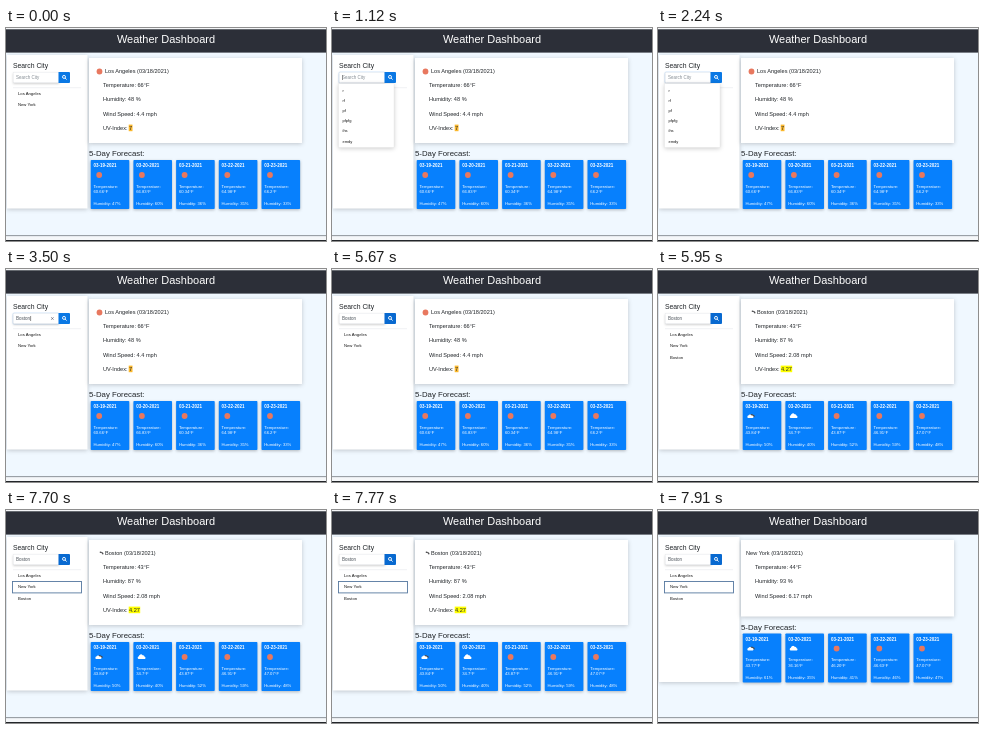
Write an HTML page that moves like this. It is 320 px wide and 213 px high and loops after 8 s.

```html
<!DOCTYPE html>
<html lang="en">
<head>
<meta charset="utf-8">
<title>Weather Dashboard</title>
<style>
html, body { margin: 0; width: 100%; height: 100%; overflow: hidden; background: #f0f8ff; }
svg { display: block; width: 100vw; height: 100vh; font-family: "Liberation Sans", Arial, sans-serif; fill: #212529; }
text { white-space: pre; }
.panel { fill: #fff; filter: drop-shadow(0 1.5px 2px #0003); }
.card { fill: #0780fd; filter: drop-shadow(0 1px 1.5px #0004); }
.field { fill: #fff; filter: drop-shadow(0 1px 1px #0003); }
.white { fill: #fff; }
.sun { fill: #e8785f; }
.anim { animation: 8s step-end infinite; }

.la { animation-name: la; }
.boston { animation-name: boston; }
.boston-uv { animation-name: bostonUv; }
.new-york { animation-name: newYork; }
.added { animation-name: added; }
.picked { animation-name: picked; }
.hint { animation-name: hint; }
.typed { animation-name: typed; }
.clear { animation-name: clear; }
.pressed { animation-name: pressed; }
.edge { animation-name: edge; }
.caret { animation-name: blink; }
.shrink { height: var(--h); animation-name: shrink; }
.lift { animation-name: lift; }
.ring { animation: ring 8s linear infinite; }
.menu { animation: menu 8s linear infinite; }

@keyframes la { 0% { opacity: 1 } 72.6%, 100% { opacity: 0 } }
@keyframes boston { 0% { opacity: 0 } 72.6% { opacity: 1 } 98%, 100% { opacity: 0 } }
@keyframes bostonUv { 0% { opacity: 0 } 74.3% { opacity: 1 } 98%, 100% { opacity: 0 } }
@keyframes newYork { 0% { opacity: 0 } 98%, 100% { opacity: 1 } }
@keyframes added { 0% { opacity: 0 } 72.6%, 100% { opacity: 1 } }
@keyframes picked { 0% { opacity: 0 } 95.375%, 100% { opacity: 1 } }
@keyframes hint { 0% { opacity: 1 } 30.625%, 100% { opacity: 0 } }
@keyframes typed { 0% { opacity: 0 } 30.625%, 100% { opacity: 1 } }
@keyframes clear { 0% { opacity: 0 } 30.625% { opacity: 1 } 67.375%, 100% { opacity: 0 } }
@keyframes pressed { 0% { fill: #0a78e4 } 67.375%, 100% { fill: #0869d0 } }
/* Without the UV line the row is shorter and the forecast sits higher. */
@keyframes shrink {
  0%, 74.3% { height: var(--h) }
  72.6%, 98%, 100% { height: calc(var(--h) - 8.5px) }
}
@keyframes lift {
  0%, 74.3% { transform: none }
  72.6%, 98%, 100% { transform: translateY(-8.5px) }
}
@keyframes edge {
  0% { transform: none }
  30.625% { transform: translateX(3px) }
  34.125% { transform: translateX(5.5px) }
  35.875% { transform: translateX(7.75px) }
  40.25% { transform: translateX(9px) }
  41.125% { transform: translateX(11.5px) }
  43.75%, 100% { transform: translateX(14.1px) }
}
@keyframes blink {
  0% { opacity: 0 } .875% { opacity: 1 } 7% { opacity: 0 } 14% { opacity: 1 } 21% { opacity: 0 }
  30.625% { opacity: 1 } 50.75% { opacity: 0 } 56.875% { opacity: 1 } 63.875%, 100% { opacity: 0 }
}
@keyframes ring { 0%, .6% { opacity: 0 } 2.6%, 67.3% { opacity: 1 } 69.2%, 100% { opacity: 0 } }
@keyframes menu { 0%, 1.7% { opacity: 0 } 2.6%, 30.6% { opacity: 1 } 31.5%, 100% { opacity: 0 } }
</style>
</head>
<body>
<svg viewBox="0 0 320 213" preserveAspectRatio="none">
  <defs>
    <circle id="sun" class="sun" r="2.9"/>
    <path id="cloud" class="white" d="M-3.3 2a1.4 1.4 0 0 1 .3-2.7 2 2 0 0 1 3.7-1 1.7 1.7 0 0 1 2 1.5 1.2 1.2 0 0 1 .3 2.2z"/>
    <g id="storm">
      <path d="M-1 .2a1.6 1.6 0 0 1 2.9-1.3 1.2 1.2 0 0 1 1.2 2z" fill="#48484a"/>
      <path class="white" d="M-3.2 2a1.3 1.3 0 0 1 .4-2.4 1.8 1.8 0 0 1 3.2 0 1.3 1.3 0 0 1 1.2 2.4z"/>
    </g>
  </defs>
  <rect width="320" height="213" fill="#f0f8ff"/>
  <rect class="panel anim shrink" x="1" y="27" width="80.5" style="--h: 153.5px"/>
  <rect class="panel anim shrink" x="83" y="30" width="213" style="--h: 85px"/>

  <rect width="320" height="2" fill="#f4f5f7"/>
  <rect y="1.3" width="320" height="23.3" fill="#2c2f38"/>
  <text class="white" x="160" y="15.4" font-size="11" text-anchor="middle">Weather Dashboard</text>
  <text x="7" y="40" font-size="6.8">Search City</text>

  <g font-size="4.2" fill="#111">
    <path d="M7 59.7H75" stroke="#e3e5e8" stroke-width=".5"/>
    <text x="12" y="66.7">Los Angeles</text>
    <text x="12" y="78.3">New York</text>
    <text class="anim added" x="12" y="89.7">Boston</text>
    <rect class="anim picked" x="6.5" y="71.5" width="69" height="11.4" fill="none" stroke="#56789f" stroke-width=".9"/>
  </g>

  <rect class="ring" x="6.5" y="43.5" width="47" height="12" rx="1.6" fill="#d6eaff"/>
  <rect class="field" x="7.2" y="44.2" width="46" height="10.6" rx="1" stroke="#d8dde2" stroke-width=".4"/>
  <g font-size="4.5" fill="#495057">
    <text class="anim typed" x="10" y="51">Boston</text>
    <g class="anim edge">
      <rect class="white" x="10" y="46" width="15" height="7"/>
      <rect class="anim caret" x="10" y="47" width=".5" height="5" fill="#222"/>
    </g>
    <text class="anim hint" x="10" y="51" fill="#858d94">Search City</text>
    <path class="anim clear" d="M45.3 48.3l2.2 2.4m0-2.4l-2.2 2.4" stroke="#667" stroke-width=".8"/>
  </g>
  <path class="anim pressed" d="M52.5 44h10.5a1 1 0 0 1 1 1v9a1 1 0 0 1-1 1h-10.5z"/>
  <g fill="none" stroke="#fff" stroke-width=".9"><circle cx="58" cy="48.9" r="1.5"/><path d="M59.1 50l1.5 1.6"/></g>

  <g class="menu">
    <rect class="panel" x="6.5" y="55.5" width="55.5" height="64" rx="1" stroke="#ddd" stroke-width=".3"/>
    <g id="menu" font-size="4" fill="#111"></g>
  </g>

  <g id="main" font-size="5.6"></g>
  <g class="anim lift">
    <text x="83" y="128" font-size="7.8">5-Day Forecast:</text>
    <g id="cards" font-size="4.2"></g>
  </g>

  <rect y="207.4" width="320" height=".9" fill="#62676c"/>
  <rect y="208.3" width="320" height="3.7" fill="#f5f7f9"/>
  <rect y="212" width="320" height="1" fill="#23262a"/>
</svg>
<script>
const $ = id => document.getElementById(id);
const text = (x, y, s, attrs = '') => `<text x="${x}" y="${y}" ${attrs}>${s}</text>`;
const icon = (name, x, y) => `<use href="#${name}" x="${x}" y="${y}"/>`;
const group = (cls, body) => `<g class="anim ${cls}">${body}</g>`;

$('menu').innerHTML = ['r', 'rf', 'pf', 'pfpfg', 'ihs', 'emdy']
  .map((s, i) => text(10.5, 63.5 + i * 10.2, s)).join('');

const current = (city, x, temp, hum, wind) =>
  text(x, 45.4, `${city} (03/18/2021)`) +
  [`Temperature: ${temp}°F`, `Humidity: ${hum} %`, `Wind Speed: ${wind} mph`]
    .map((s, i) => text(97, 59.2 + i * 14.2, s)).join('');

const uv = (value, width, color) =>
  text(97, 101.8, 'UV-Index:') +
  `<rect x="122.7" y="96.6" width="${width}" height="6.6" fill="${color}"/>` +
  text(123, 101.8, value);

$('main').innerHTML =
  group('la', icon('sun', 93.5, 43.5) + current('Los Angeles', 99, 66, 48, 4.4) + uv('7', 3.8, '#fbb82d')) +
  group('boston', icon('storm', 94, 43.5) + current('Boston', 99, 43, 87, 2.08)) +
  group('boston-uv', uv('4.27', 11.5, '#ff0')) +
  group('new-york', current('New York', 88, 44, 93, 6.17));

const cardX = i => 84.7 + i * 42.7;
const forecast = (icons, temps, hums) => temps.map((t, i) => {
  const x = cardX(i) + 2.8;
  return icon(icons[i], x + 5.7, 147) + text(x, 165.3, t + '°F') + text(x, 177, `Humidity: ${hums[i]}%`);
}).join('');

const sunny = Array(5).fill('sun');
const mixed = ['storm', 'cloud', 'sun', 'sun', 'sun'];
$('cards').innerHTML = sunny.map((_, i) => {
  const x = cardX(i);
  return `<rect class="card" x="${x}" y="132" width="38.6" height="49" rx=".8"/><g class="white">` +
    text(x + 2.8, 139.2, `03-${19 + i}-2021`, 'font-size="4.5" font-weight="bold"') +
    text(x + 2.8, 159.8, 'Temperature:') + '</g>';
}).join('') + '<g class="white">' +
  group('la', forecast(sunny, ['60.66', '66.83', '60.34', '64.98', '66.2'], [47, 60, 36, 35, 33])) +
  group('boston', forecast(mixed, ['43.84', '34.7', '43.87', '46.91', '47.07'], [50, 40, 52, 59, 48])) +
  group('new-york', forecast(mixed, ['43.77', '36.16', '46.20', '46.63', '47.07'], [61, 35, 41, 46, 47])) +
  '</g>';
</script>
</body>
</html>
```
